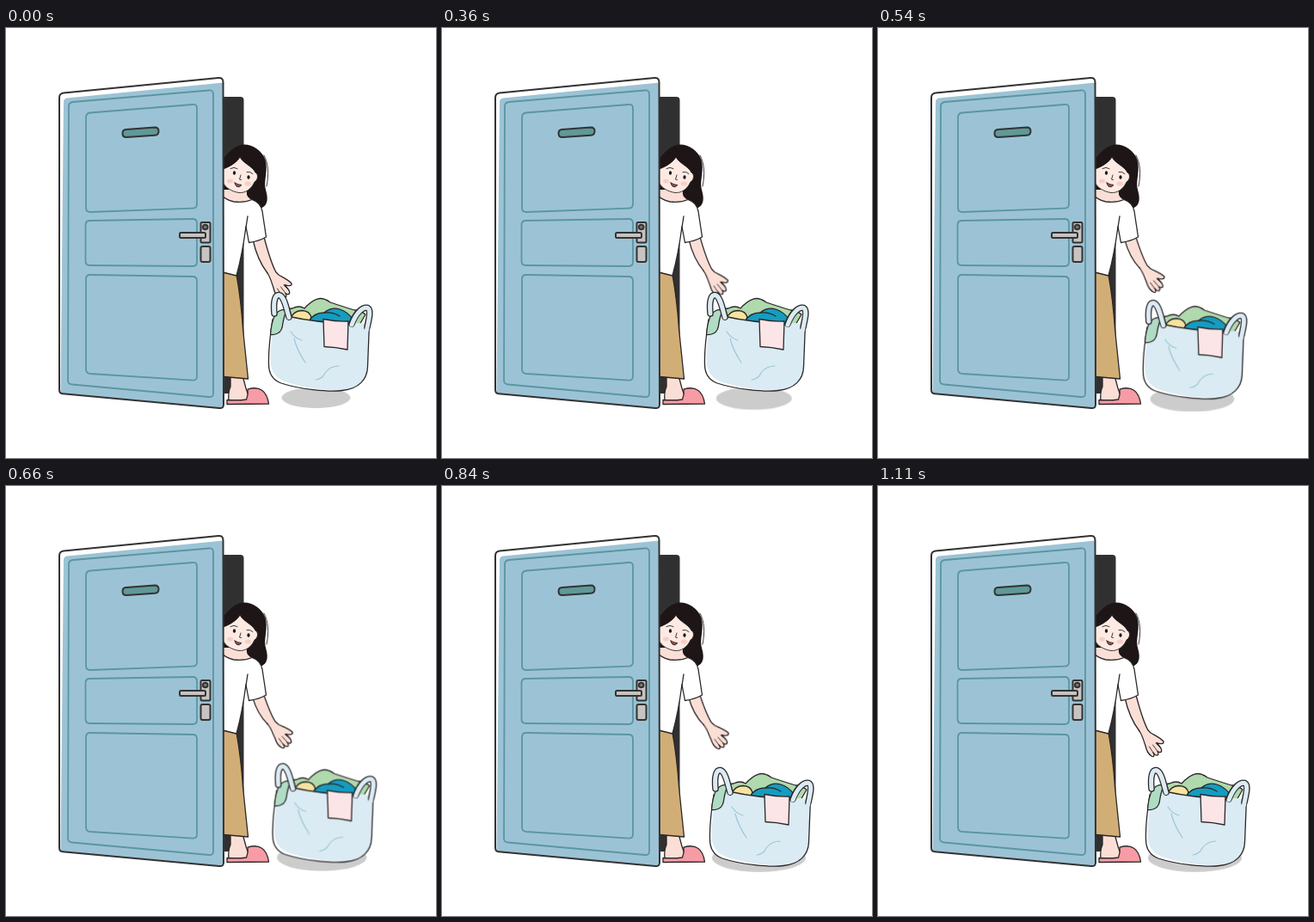
Write an HTML page without scripts that moves like this. It is 500 px wide and 500 px high and loops after 1800 ms.

```html
<!DOCTYPE html>
<html lang="en">
<head>
<meta charset="utf-8">
<title>Laundry at the door</title>
<style>
html, body { margin: 0; width: 100%; height: 100%; overflow: hidden; background: #fff; }
svg { display: block; width: 100%; height: 100%; }
.ink { stroke: #2b2728; stroke-width: 1.3; stroke-linejoin: round; stroke-linecap: round; }
.bold { stroke: #333; stroke-width: 2; stroke-linejoin: round; }
.line { fill: none; }
.thin { stroke-width: .9; }
.teal { fill: none; stroke: #5a96a2; stroke-width: 1.8; }
.crease { fill: none; stroke: #9cc8d9; stroke-width: 1.2; stroke-linecap: round; }
.skin { fill: #fbdfd6; }
.hair { fill: #1d1516; }
.metal { fill: #c6c3c0; }
.cloth { fill: #dbebf3; }
.green { fill: #b0d9ae; }
.mint { fill: #b0dcc4; }
.strap { fill: none; stroke: #dbebf3; stroke-width: 5; stroke-linecap: round; }
.strap.edge { stroke: #2b2728; stroke-width: 7.6; }
.forearm path { vector-effect: non-scaling-stroke; }

.forearm, .hand, .bag, .shade { animation: 1.8s linear infinite; }
.forearm { animation-name: forearm; transform-origin: 293px 248px; }
.hand { animation-name: hand; transform-origin: 308px 288px; }
.bag { animation-name: slide; }
.shade { animation-name: spread; transform-origin: 0 0; }

/* motion advances every 30 ms */
@keyframes forearm {
  0%, 61.667%, 100% { transform: scale(1, 1); }
  11.667% { transform: scale(1, 1); animation-timing-function: steps(18, end); }
  41.667% { transform: scale(1.03, .74); animation-timing-function: steps(12, end); }
}
@keyframes hand {
  0%, 61.667%, 100% { transform: translate(0, 0) rotate(0deg); }
  11.667% { transform: translate(0, 0) rotate(0deg); animation-timing-function: steps(18, end); }
  41.667% { transform: translate(.5px, -10.5px) rotate(-6deg); animation-timing-function: steps(12, end); }
}
@keyframes slide {
  0% { transform: translate(0, 0); }
  20% { transform: translate(0, 0); animation-timing-function: steps(13, end); }
  41.667%, 100% { transform: translate(6px, 20px); }
}
@keyframes spread {
  0% { transform: translate(360.5px, 430px) scale(40, 12); }
  11.667% { transform: translate(360.5px, 430px) scale(40, 12); animation-timing-function: steps(18, end); }
  41.667%, 100% { transform: translate(368.5px, 432.3px) scale(54.5px, 16.5px); transform: translate(368.5px, 432.3px) scale(54.5, 16.5); }
}
</style>
</head>
<body>
<svg viewBox="0 0 500 500">
  <ellipse class="shade" rx="1" ry="1" fill="#cdcccc"/>

  <!-- doorway -->
  <path d="M250 80H272.500Q276.500 80 276.500 84V425H250Z" fill="#303030"/>

  <!-- leg and slipper -->
  <path class="skin ink" d="M261 404V417Q258 424 259 433L284 433L279 419 275 404Z"/>
  <path class="ink" fill="#f79ba5" d="M257 437.500V432.500Q270 433.500 279.500 432Q282 426 281 420Q302 414 305.500 437Z"/>
  <path class="ink" fill="#d2ae77" d="M248 283L268 287Q273.500 318 275.500 350L281.500 408 248 405Z"/>

  <!-- arm -->
  <g class="forearm">
    <path class="skin" d="M287 246C291 264 297 276 304 285L305 287 315 286 314 284C309 275 305 262 300 243Z"/>
    <path class="ink line" d="M287 246C291 264 297 276 304 285M300 243C305 262 309 275 314 284"/>
  </g>
  <g class="hand">
    <path class="skin ink" d="M304 285C308 291 309 297 311 302C312 307 315 312 318 314C321 316 322 313 320 310L322 312.500C326 314 327 312 325 308.500L327 309.500C331 310 330 306 328 303.500L324 298.500C328 300.500 333 300 332 297C329 293 322 290 317 287L314 284"/>
    <path class="ink line thin" d="M315.500 303L320.500 311M319.500 301L325.500 309M323 299L328 304"/>
  </g>

  <!-- head -->
  <path class="hair" d="M248 156C256 150 260 141 269 137.500C280 132 296 139 301.500 153C305 165 300 176 301.500 186C304 195 306.500 205 297 209.500C288 209 277 204 270 198L248 192Z"/>
  <path class="ink line thin" d="M300 148C305 157 306 170 303 184"/>
  <path class="skin" d="M248 188L262 188 280 190C279 196 283 198 286 200L272 206 248 200Z"/>
  <path fill="#fdeae3" class="ink thin" d="M248 164C260 162 269 156 272 150C276 158 286 160 290 168C293 169 294 176 289 179C285 188 278 192 271 191.500C262 190 255 186 252 179L248 177Z"/>
  <path class="hair" d="M248 166C258 163 269 157 272 149C276 157 286 159 291 169L294 150 274 138 248 154Z"/>
  <g fill="#f9cec8">
    <ellipse cx="260.500" cy="178" rx="3.500" ry="2.600"/>
    <ellipse cx="281.500" cy="181" rx="3.800" ry="2.600"/>
  </g>
  <g class="hair">
    <ellipse cx="265.500" cy="168.500" rx="1.600" ry="2.200"/>
    <ellipse cx="282" cy="173.500" rx="1.600" ry="2.200"/>
  </g>
  <path class="ink line thin" d="M261 163.500Q265 161 269 163.500M280 167.500Q284 166.500 287 169.500M273 171L271.500 176 273.500 176.500"/>
  <path class="ink thin" fill="#a5474b" d="M266 180Q270 182.500 274 182.500Q271.500 186 268.500 184.500Q266.500 183 266 180Z"/>

  <!-- shirt -->
  <path class="ink" fill="#fff" d="M248 192Q255 200 265 202Q277 203.500 286 199.500Q296 203 298 213L302.500 243Q294 248 282.500 249.500L279 231Q275 262 268 288L248 283Z"/>
  <path class="ink line" d="M281 219L279 232"/>

  <!-- door -->
  <path fill="#fff" d="M62 81Q62 76 67 75.500L247 58Q252.500 57.500 252.500 63L253 438Q253 442.500 248 442L66 425.300Q62 425 62 420.500Z"/>
  <path fill="#9cc3d5" d="M67 86Q67 82 71 81.500L252.500 63.500 253 442 67 425.300Q63.500 425 63.500 420.500Z"/>
  <path class="line bold" stroke-width="1.800" d="M62 81Q62 76 67 75.500L247 58Q252.500 57.500 252.500 63L253 438Q253 442.500 248 442L66 425.300Q62 425 62 420.500Z"/>
  <g class="teal">
    <path d="M236 72.500L78 86Q73 86.500 73 91L72 410Q72 414 77 414.500L236 429Q241 429.500 241 425V77Q241 72 236 72.500Z"/>
    <path d="M93 104Q93 99 98 98.500L217 89Q222 88.500 222 93V205Q222 209.500 217 209.700L98 214Q93 214 93 209Z"/>
    <path d="M92.500 229Q92.500 224 97.500 224L217 222Q222 222 222 227V272Q222 277 217 277L97.500 276Q92.500 276 92.500 271Z"/>
    <path d="M93 292Q93 287 98 287L217 289Q222 289 222 294V405Q222 410 217 409.700L98 402Q93 401.500 93 397Z"/>
  </g>
  <path class="bold" fill="#5f9998" d="M139.500 118L173 115.500Q177.500 115.500 177.500 120Q177.500 124.500 173 124.800L140 127Q135.500 127 135.500 122.500Q135.500 118.300 139.500 118Z"/>
  <g class="metal bold">
    <rect x="226.500" y="226" width="11" height="23.500" rx="1.500"/>
    <circle cx="231.700" cy="231.500" r="2.800" fill="#777"/>
    <rect x="202" y="238" width="30" height="6" rx="1.500"/>
    <rect x="226.500" y="254" width="11" height="18" rx="2"/>
  </g>

  <!-- laundry bag -->
  <g class="bag">
    <path class="green ink" d="M318 340Q319 327 333 326Q341 322 347 326Q355 317 362 315Q369 313 377 319Q395 325 405 328Q412 328 418 333L410 347 326 343Z"/>
    <path class="ink" fill="#f5e3a0" d="M331 338Q334 329 344 328.500Q353 329 355 336L352 343 333 341Z"/>
    <path class="ink" fill="#159cc0" d="M352 341Q358 331 370 331Q378 324 388 327Q397 330 403 338L398 346 354 343Z"/>
    <path class="ink line" d="M370 331Q380 330 388 335"/>
    <path fill="#fff" d="M310 339C308 352 305 378 305.500 391C305.500 401 309.500 409 320 413C341 420 375 423.500 391 421.500C410 419.500 420 409 420.500 394L422.500 343 398 344Q360 342.500 322 335Z"/>
    <path class="cloth" d="M312 339C310 352 307 376 307.500 387C308 399 313 407 324 411C343 418 375 422 391 421.500C410 419.500 420 409 420.500 394L422.500 343 398 344Q360 342.500 322 335Z"/>
    <path class="ink line" d="M310 339C308 352 305 378 305.500 391C305.500 401 309.500 409 320 413C341 420 375 423.500 391 421.500C410 419.500 420 409 420.500 394L422.500 343M402 344Q360 342.500 327 335"/>
    <path class="crease" d="M331 353Q336 361 344 363M335 361Q338 374 348 389M360 409Q368 408 371 401Q377 393 387 393"/>
    <path class="mint ink" d="M307.500 356.500Q308.500 342 313 333Q319 326 326 328Q323 337 322 343Q321 353 316 355Q312 357 307.500 356.500Z"/>
    <path class="ink" fill="#fbe5e6" d="M369 338.500Q384 341.500 398 341L397 374Q383 371 370 370.500Z"/>
    <path class="strap edge" d="M312 332C310.500 316 313.500 310 317.500 310.500C323.500 312 325.500 324 329 336"/>
    <path class="strap" d="M312 332C310.500 316 313.500 310 317.500 310.500C323.500 312 325.500 324 329 336.500"/>
    <path class="strap edge" d="M402 344C407 331 415 324 420.500 325.500C425 328 422 338 420 348"/>
    <path class="strap" d="M402 345C407 331 415 324 420.500 325.500C425 328 422 338 419.500 351"/>
  </g>
</svg>
</body>
</html>
```
